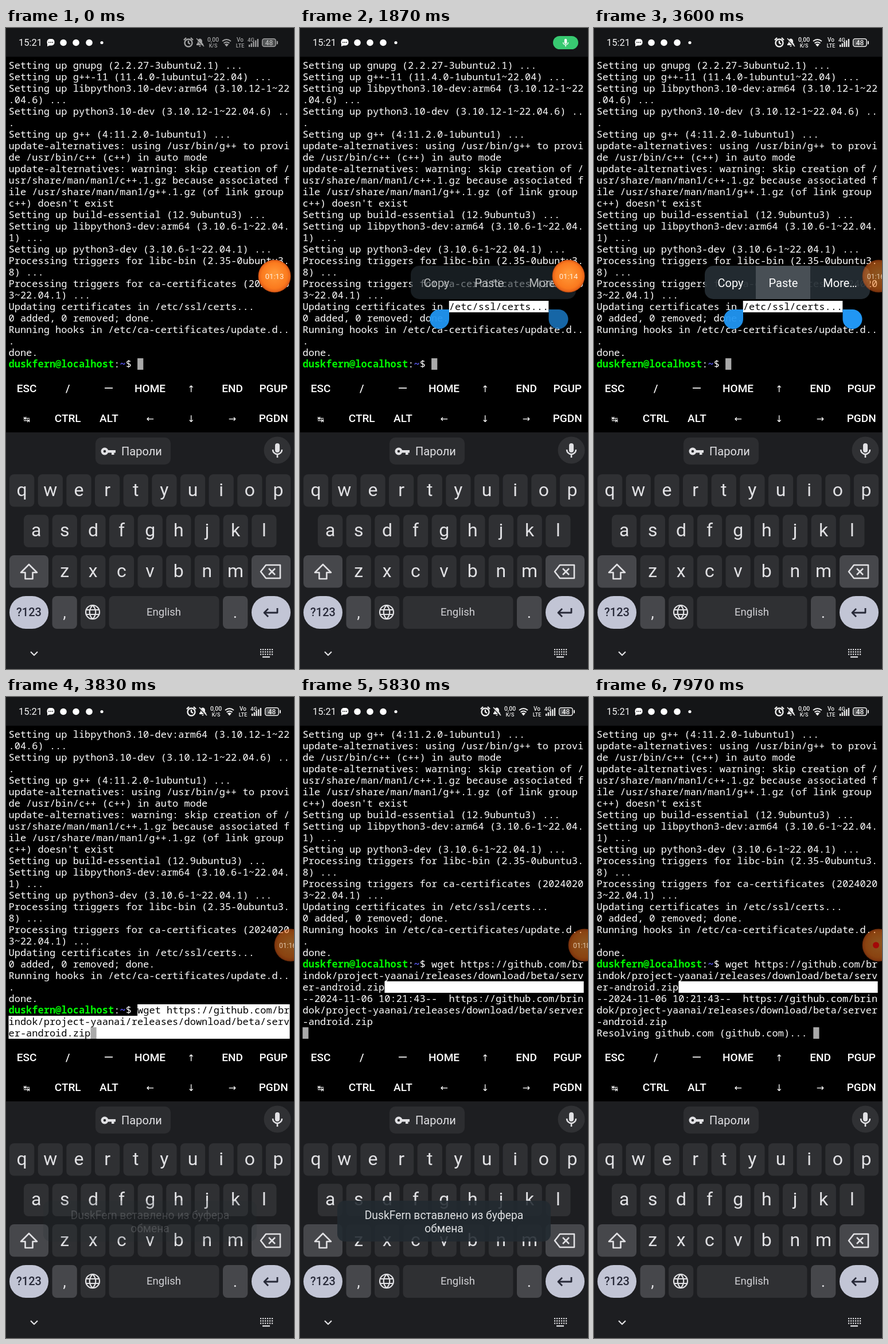
Recreate the animation shown at these times as an HTML page with a canvas. Size 502 by 1116 pixels, loop 8 s.

```html
<!DOCTYPE html>
<html lang="ru">
<head>
<meta charset="utf-8">
<style>
html, body { margin: 0; width: 502px; height: 1116px; overflow: hidden; background: #000; }
canvas { display: block; }
</style>
</head>
<body>
<canvas id="stage" width="502" height="1116"></canvas>
<script>
const c = document.getElementById('stage').getContext('2d');
const LOOP = 8000, ROW = 20, CH = 10.21, LEFT = 4.5, TOP = 55;
const MONO = '"Noto Sans Mono", "DejaVu Sans Mono", monospace';
const SANS = 'Roboto, "Noto Sans", sans-serif';
const USER = 'duskfern@localhost';

const lines = `Setting up gnupg (2.2.27-3ubuntu2.1) ...
Setting up g++-11 (11.4.0-1ubuntu1~22.04) ...
Setting up libpython3.10-dev:arm64 (3.10.12-1~22
.04.6) ...
Setting up python3.10-dev (3.10.12-1~22.04.6) ..
.
Setting up g++ (4:11.2.0-1ubuntu1) ...
update-alternatives: using /usr/bin/g++ to provi
de /usr/bin/c++ (c++) in auto mode
update-alternatives: warning: skip creation of /
usr/share/man/man1/c++.1.gz because associated f
ile /usr/share/man/man1/g++.1.gz (of link group
c++) doesn't exist
Setting up build-essential (12.9ubuntu3) ...
Setting up libpython3-dev:arm64 (3.10.6-1~22.04.
1) ...
Setting up python3-dev (3.10.6-1~22.04.1) ...
Processing triggers for libc-bin (2.35-0ubuntu3.
8) ...
Processing triggers for ca-certificates (2024020
3~22.04.1) ...
Updating certificates in /etc/ssl/certs...
0 added, 0 removed; done.
Running hooks in /etc/ca-certificates/update.d..
.
done.
${USER}:~$ wget https://github.com/br
indok/project-yaanai/releases/download/beta/serv
er-android.zip
--2024-11-06 10:21:43--  https://github.com/brin
dok/project-yaanai/releases/download/beta/server
-android.zip
Resolving github.com (github.com)... `.split('\n');
const PROMPT = 26;

const ramp = (t, a, b) => Math.min(1, Math.max(0, (t - a) / (b - a)));
const ease = k => k * k * (3 - 2 * k);

function rect(x, y, w, h, r, fill) {
  c.fillStyle = fill;
  c.beginPath();
  c.roundRect(x, y, w, h, r);
  c.fill();
}
function disc(x, y, r, fill) {
  c.fillStyle = fill;
  c.beginPath();
  c.arc(x, y, r, 0, 7);
  c.fill();
}
function text(s, x, y, font, fill = '#fff', align = 'center') {
  c.font = font;
  c.fillStyle = fill;
  c.textAlign = align;
  c.fillText(s, x, y);
}
function stroke(d, color, width = 2) {
  c.strokeStyle = color;
  c.lineWidth = width;
  c.stroke(new Path2D(d));
}
function fill(d, color) {
  c.fillStyle = color;
  c.fill(new Path2D(d));
}
function faded(alpha, draw) {
  if (alpha <= 0) return;
  c.save();
  c.globalAlpha = alpha;
  draw();
  c.restore();
}

// Terminal cells
const cellX = col => LEFT + col * CH;
const cells = (row, from, to, color) =>
  rect(cellX(from), TOP + row * ROW, (to - from) * CH, ROW, 0, color);
function put(s, row, col, color = '#fff', weight = '') {
  text(s, cellX(col), TOP + row * ROW + 16, `${weight} 17px ${MONO}`, color, 'left');
}

function terminal(t) {
  const pasted = t >= 3770, entered = t >= 5700, resolved = t >= 6100;
  const shift = entered ? 6 : pasted ? 2 : 0;
  const last = resolved ? 32 : entered ? 31 : pasted ? 28 : PROMPT;
  const marked = pasted && !entered;
  for (let i = shift; i <= last; i++) {
    const row = i - shift;
    if (i !== PROMPT) {
      const lit = marked && i > PROMPT;
      if (lit) cells(row, 0, 48, '#fff');
      put(lines[i], row, 0, lit ? '#000' : '#fff');
      if (entered && i === 28) cells(row, 14, 48, '#fff');
      continue;
    }
    put(USER, row, 0, '#00f900', 'bold');
    put(':', row, 18);
    put('~', row, 19, '#5c5cff', 'bold');
    put('$', row, 20);
    if (marked) cells(row, 22, 48, '#fff');
    if (pasted) put(lines[i].slice(22), row, 22, marked ? '#000' : '#fff');
  }
  const col = resolved ? 37 : entered ? 0 : pasted ? 14 : 22;
  cells(26, col, col + 1, '#a9a9a9');

  if (t >= 1700 && !pasted) {
    cells(21, 25, 42, '#fff');
    put('/etc/ssl/certs...', 21, 25, '#000');
  }
}

function extraKeys() {
  const rows = [['ESC', '/', '', 'HOME', '↑', 'END', 'PGUP'],
                ['↹', 'CTRL', 'ALT', '←', '↓', '→', 'PGDN']];
  rows.forEach((keys, r) => keys.forEach((k, i) => {
    const arrow = '↹←↑→↓'.includes(k);
    const font = arrow ? `${k === '↹' ? 14 : 16}px "DejaVu Sans", sans-serif` : `500 19px ${SANS}`;
    text(k, 36 + i * 71.7, 633.5 + r * 52.5, font);
  }));
  rect(172, 626, 14, 1.7, 0, '#fff');
}

function mic(x, y, s, color) {
  c.save();
  c.translate(x, y);
  c.scale(s, s);
  rect(-4, -13, 8, 16, 4, color);
  stroke('M-8-2a8 8 0 0 0 16 0M0 6v6', color, 2.6);
  c.restore();
}

function keyboard() {
  const ink = '#e1e1e4', key = '#2f3033', side = '#46474b', pale = '#c2c5d5', dark = '#272938';
  rect(0, 704, 502, 412, 0, '#1d1e21');
  rect(156, 713, 131, 47, 10, '#2c2d30');
  disc(473, 735, 23.5, '#303134');
  mic(473, 736, 1, ink);
  disc(172, 737, 6.5, ink);
  rect(176, 735, 15, 4.5, 0, ink);
  rect(184, 737, 4.5, 6, 0, ink);
  disc(172, 737, 2.3, '#2c2d30');
  text('Пароли', 201, 744, `20px ${SANS}`, ink, 'left');

  [['qwertyuiop', 6], ['asdfghjkl', 31], ['zxcvbnm', 80.5]].forEach(([row, x0], r) => {
    const y = 777 + r * 70.5;
    [...row].forEach((k, i) => {
      const x = x0 + i * 49.65;
      rect(x, y, 43.3, 56.5, 8, key);
      text(k, x + 21.6, y + 37.5, `32px ${SANS}`, ink);
    });
  });

  rect(6, 918, 68, 56.5, 8, side);
  rect(428, 918, 68, 56.5, 8, side);
  c.lineJoin = 'round';
  stroke('M40 934L26 948H33.500V959H46.500V948H54Z', ink, 2.6);
  stroke('M453 935H478V958H453L444 946.500ZM458 941l11 11m0-11l-11 11', ink, 2.6);

  const y = 989, h = 57;
  rect(6, y, 68, h, 28.5, pale);
  text('?123', 40, 1024, `500 20px ${SANS}`, dark);
  rect(80.5, y, 43.3, h, 8, side);
  text(',', 102, 1027, `28px ${SANS}`, ink);
  rect(130, y, 43.3, h, 8, key);
  stroke('M139 1017a12 12 0 1 0 24 0a12 12 0 1 0-24 0M151 1005c-7 7-7 17 0 24c7-7 7-17 0-24M140 1013h22M140 1021h22', ink, 2.2);
  rect(179.5, y, 192, h, 8, key);
  text('English', 275, 1023, `18.5px ${SANS}`, '#d2d2d6');
  rect(378, y, 43.3, h, 8, side);
  text('.', 399.5, 1027, `28px ${SANS}`, ink);
  rect(428, y, 68, h, 28.5, pale);
  stroke('M473 1010V1018H450M457 1011l-7 7l7 7', dark, 2.8);

  stroke('M43 1086l6 6l6-6', ink, 2.2);
  for (let r = 0; r < 3; r++)
    for (let i = 0; i < 6; i++) rect(443 + i * 4, 1081 + r * 4.2, 2.2, 2.2, 0, ink);
  rect(447, 1094, 13, 2.2, 0, ink);
}

function statusIcons() {
  const w = '#eee';
  stroke('M316.500 26a6.500 6.500 0 1 0 13 0a6.500 6.500 0 1 0-13 0M323 22v4l3 2M315 21l4-4M331 21l-4-4', w, 2.4);
  fill('M337 30V28l2-2V23c0-6 8-6 8 0v3l2 2v2zM341 31h4l-2 2z', w);
  stroke('M336 18l14 15', '#141517', 3);
  stroke('M337 18l13 14', w, 1.6);
  text('0,00', 366, 24, `500 10.5px ${SANS}`, w);
  text('K/S', 366, 34, `500 9px ${SANS}`, w);
  stroke('M382 23q7.500-6 15 0M384.500 26.500q5-4 10 0', w, 2);
  fill('M386 28.500q3.500-2.500 7 0l-3.500 4z', w);
  text('Vo', 413, 24, `500 10px ${SANS}`, w);
  text('LTE', 413, 34, `500 9px ${SANS}`, w);
  text('4G', 432, 24, `500 9.5px ${SANS}`, w);
  for (let i = 0; i < 5; i++) rect(428 + i * 3.7, 29 - i * 2.5, 2.3, 4 + i * 2.5, 0, w);
  rect(451, 18, 25, 15, 4.5, w);
  rect(452.5, 19.5, 22, 12, 3, '#1c1d1f');
  rect(453.5, 20.5, 10, 10, 2, '#56585a');
  rect(477, 22.5, 2, 6, 1, w);
  text('48', 463.5, 30, `500 12px ${SANS}`, w);
}

function statusBar(t) {
  rect(0, 0, 502, 50, 0, '#141517');
  text('15:21', 22, 31, `16.5px ${SANS}`, '#f4f4f4', 'left');
  rect(71.500, 19, 13, 11.500, 5, '#fff');
  fill('M72 25v7l5-2z', '#fff');
  [75, 78, 81].forEach(x => disc(x, 25, 0.9, '#141517'));
  [100, 122, 145].forEach(x => disc(x, 25.5, 5.8, '#fff'));
  disc(167, 25.5, 2.6, '#fff');

  const out = ramp(t, -160, 290), back = ease(ramp(t, 2900, 3200));
  const shown = t < 1500 ? 1 - out : back;
  faded(shown, () => {
    c.translate(-14 * (1 - shown), 0);
    statusIcons();
  });
  const pill = ease(ramp(t, 200, 550)) * (1 - ease(ramp(t, 2600, 2950)));
  faded(Math.min(1, pill * 2), () => {
    const w = 12 + 32 * pill, h = 12 + 11 * pill;
    rect(463 - w / 2, 25.5 - h / 2, w, h, h / 2, '#38c971');
    if (pill > 0.6) mic(463, 26, 0.55, '#fff');
  });
}

function selectionUi(t) {
  if (t < 1700 || t >= 3770) return;
  const pop = ramp(t, 1700, 1950) * (1 - ramp(t, 3700, 3770));
  faded(0.95, () => rect(226, 490, 34, 34, [17, 0, 17, 17], '#2196f3'));
  faded(pop, () => rect(433.500, 490, 34, 34, [0, 17, 17, 17], '#2196f3'));
  faded(pop * 0.93, () => rect(193, 414, 288, 58, 15, '#252e34'));
  faded(pop, () => {
    if (t >= 3430) rect(282, 414, 95, 58, 0, '#484f55');
    const font = `20px ${SANS}`;
    text('Copy', 238, 451, font);
    text('Paste', 330, 451, font);
    text('More…', 429, 451, font);
  });
}

function toast(t) {
  faded(ramp(t, 3800, 3960) * (1 - ramp(t, 7400, 7700)), () => {
    const alpha = c.globalAlpha, font = `19.3px ${SANS}`;
    c.globalAlpha = alpha * 0.88;
    rect(65, 877, 372, 71, 13, '#222a30');
    c.globalAlpha = alpha;
    text('DuskFern вставлено из буфера', 251, 909, font, '#dfe1e3');
    text('обмена', 251, 932, font, '#dfe1e3');
  });
}

function bubble(t) {
  const k = ease(ramp(t, 1950, 2350)), x = 468 + 28 * k, y = 432;
  faded(1 - 0.45 * k, () => {
    const g = c.createRadialGradient(x, y - 4, 4, x, y, 28.5);
    g.addColorStop(0, '#ff9636');
    g.addColorStop(0.75, '#fb7a1e');
    g.addColorStop(0.93, '#e8641a');
    g.addColorStop(1, '#a8400c');
    disc(x, y, 28.5, g);
  });
  if (t >= 6300) return disc(491.5, y, 5.5, '#a30808');
  const sec = 13 + [900, 2000, 2900, 3850, 4770, 5880].filter(s => t >= s).length;
  faded(1 - 0.25 * k, () =>
    text('01:' + sec, x - 5 * k, y + 4.5, `${13 - k}px ${SANS}`, '#fff0dc'));
}

function frame(now) {
  const t = now % LOOP;
  c.fillStyle = '#000';
  c.fillRect(0, 0, 502, 1116);
  terminal(t);
  extraKeys();
  keyboard();
  statusBar(t);
  selectionUi(t);
  toast(t);
  bubble(t);
}

const start = performance.now();
(function tick() {
  frame(performance.now() - start);
  requestAnimationFrame(tick);
})();
</script>
</body>
</html>
```
